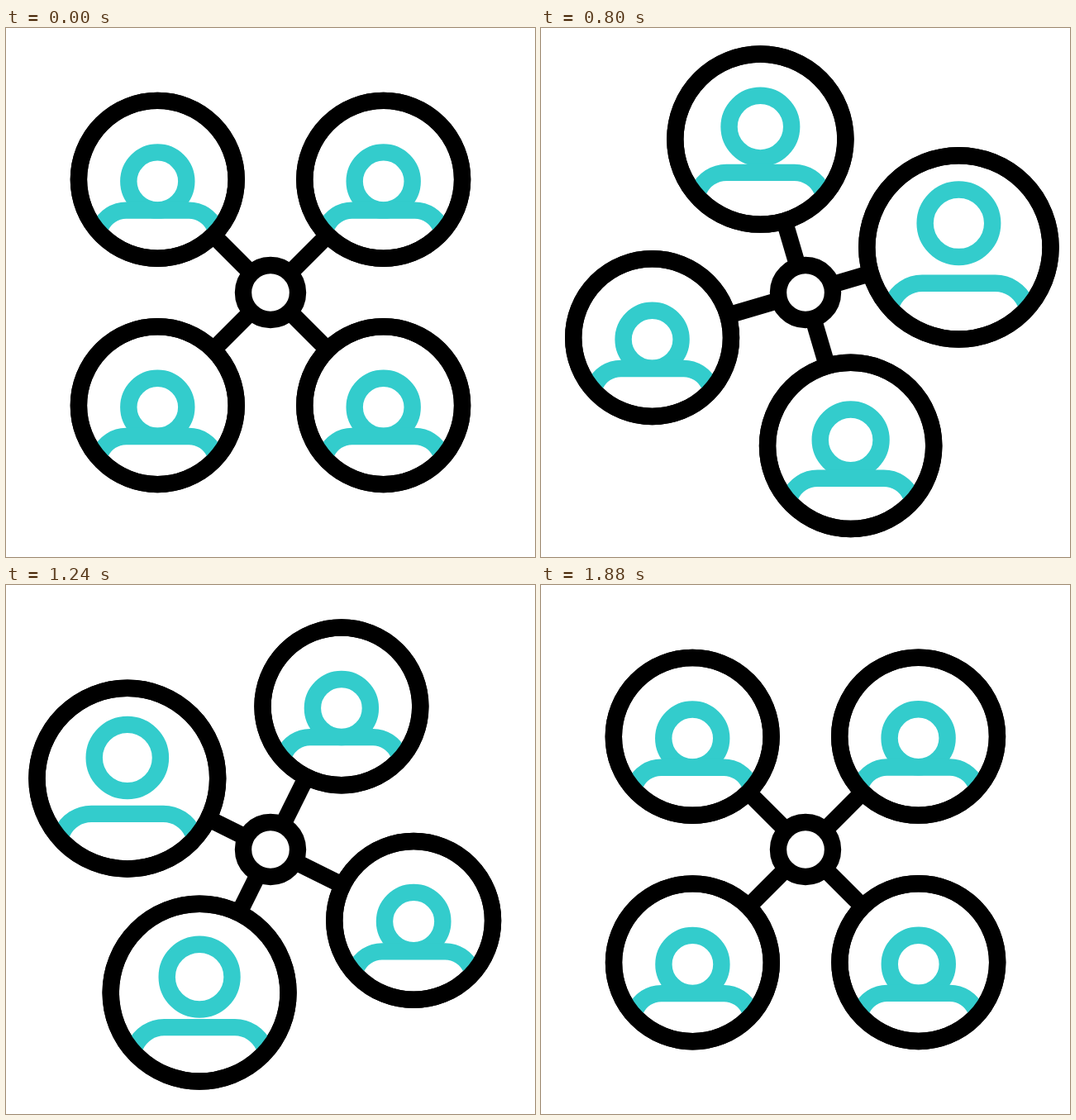
Recreate the animation shown at these times as an HTML page with a canvas. Size 640 px wide and 640 px high, loop 1.92 s.

```html
<!DOCTYPE html>
<html>
<head>
<meta charset="utf-8">
<style>
  html, body { margin: 0; height: 100%; overflow: hidden; background: #fff; }
  canvas { display: block; }
</style>
</head>
<body>
<canvas width="640" height="640"></canvas>
<script>
const ctx = document.querySelector('canvas').getContext('2d');
const LOOP = 1920, ORBIT = 193.3, TEAL = '#33cccc', RAD = Math.PI / 180;

// Clockwise from top left: peak time, half length, extra size, head lift per unit of growth
const people = [
  { peak: 575, grow: 0.143, lift: 213 },
  { peak: 805, grow: 0.165, lift: 189 },
  { peak: 1095, grow: 0.158, lift: 168 },
  { peak: 1340, grow: 0.162, lift: 186 }
];
const HALF = 490;

// Symmetric cubic bezier (a, 0, 1 - a, 1)
function ease(x, a = 0.57) {
  let lo = 0, hi = 1;
  for (let i = 0; i < 24; i++) {
    const s = (lo + hi) / 2, r = 1 - s;
    if (3 * a * s * r * r + 3 * (1 - a) * s * s * r + s ** 3 < x) lo = s; else hi = s;
  }
  return lo * lo * (3 - 2 * lo);
}

function pulse(t, { peak, grow }) {
  const d = Math.abs(t - peak) / HALF;
  return d < 1 ? grow * (1 + Math.cos(Math.PI * d)) / 2 : 0;
}

function ring(x, y, r, color, fill) {
  ctx.beginPath();
  ctx.arc(x, y, r, 0, 2 * Math.PI);
  if (fill) ctx.fill();
  ctx.strokeStyle = color;
  ctx.stroke();
}

function person(x, y, g, lift) {
  const k = 1 + g, bend = 66 * RAD;
  ctx.save();
  ctx.translate(x, y);
  ring(0, 0, 95.4 * k, '#000', true);
  ring(0, 2.1 - g * lift, 35 * k, TEAL);
  ctx.beginPath();
  ctx.arc(-38 * k, 71.3 * k, 34 * k, -Math.PI / 2 - bend, -Math.PI / 2);
  ctx.arc(38 * k, 71.3 * k, 34 * k, -Math.PI / 2, -Math.PI / 2 + bend);
  ctx.stroke();
  ring(0, 0, 95.4 * k, '#000');
  ctx.restore();
}

function draw(now) {
  const t = now % LOOP, turn = 90 * ease(t / LOOP);
  ctx.fillStyle = '#fff';
  ctx.fillRect(0, 0, 640, 640);
  ctx.lineWidth = 20.4;
  people.forEach((p, i) => {
    const a = (turn - 135 + 90 * i) * RAD;
    const x = 320 + ORBIT * Math.cos(a), y = 320 + ORBIT * Math.sin(a);
    ctx.strokeStyle = '#000';
    ctx.beginPath();
    ctx.moveTo(320, 320);
    ctx.lineTo(x, y);
    ctx.stroke();
    person(x, y, pulse(t, p), p.lift);
  });
  ring(320, 320, 33, '#000', true);
}

const start = performance.now();
function tick() {
  draw(performance.now() - start);
  requestAnimationFrame(tick);
}
tick();
</script>
</body>
</html>
```
